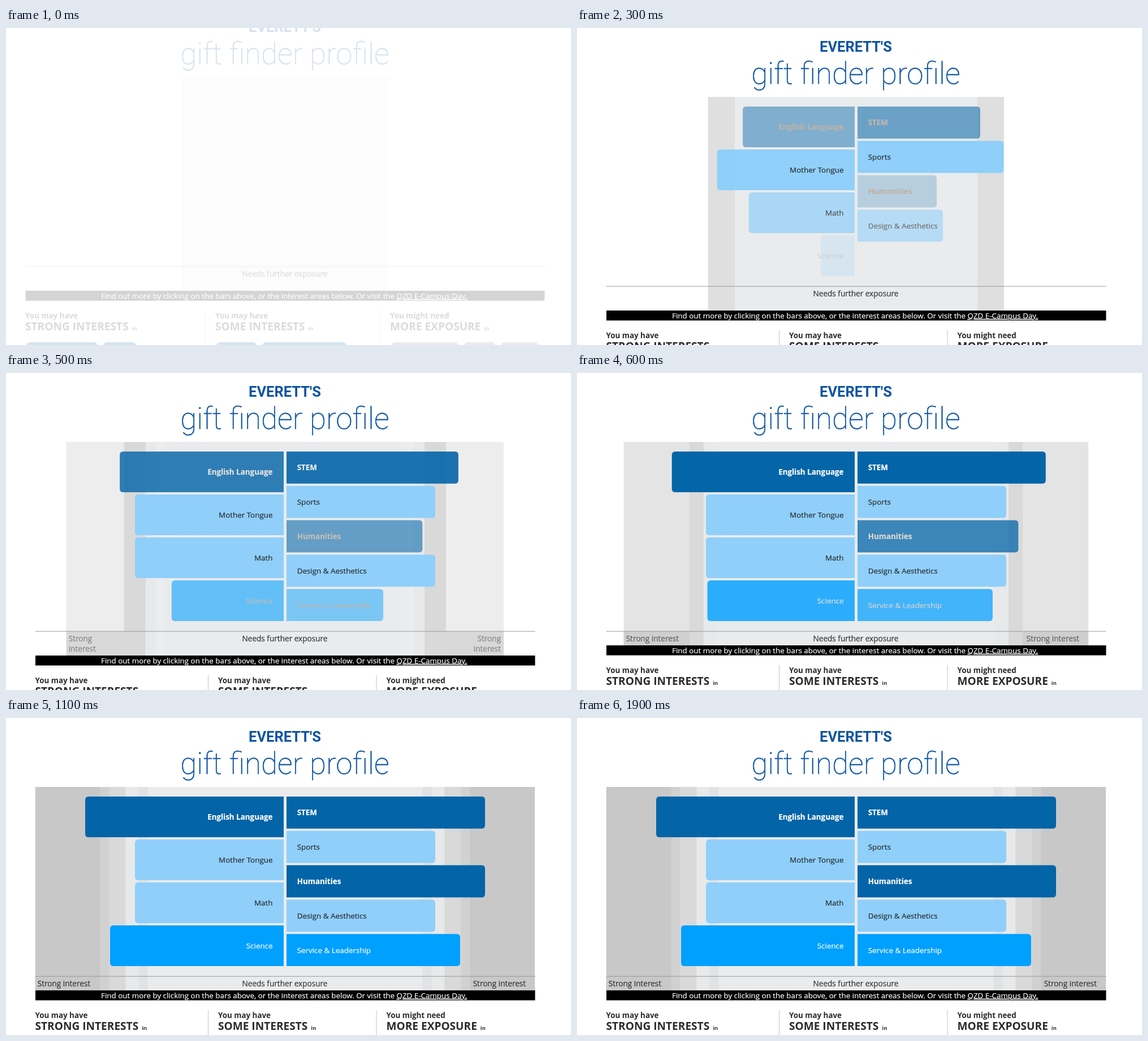
An HTML page that plays this animation: 999x561 px, repeating every 2000 ms.

```html
<!DOCTYPE html>
<html lang="en">
<head>
<meta charset="utf-8">
<title>Gift finder profile</title>
<style>
  html, body { margin: 0; width: 100%; height: 100%; overflow: hidden; background: #fff; }
  svg { display: block; width: 100%; height: 100%; font: 13.4px "Open Sans", sans-serif; color: #333; }
  text { fill: currentColor; stroke: currentColor; stroke-width: .2px; }
  .name { font: 700 25.5px Roboto, sans-serif; color: #0c54a3; stroke: none; }
  .title { font: 100 53px Roboto, sans-serif; color: #0c54a3; stroke-width: .6px; }
  .axis { font-size: 13.6px; }
  .lead, .head { font-weight: 700; color: #2b2b2b; stroke: none; }
  .head { font-size: 19.1px; }
  .in { font-size: 9.3px; }
  .note { color: #fff; }
</style>
</head>
<body>
<svg id="stage" viewBox="0 0 999 561"></svg>
<script>
const LOOP = 2000, STEP = 100;
const LEFT = 52, RIGHT = 935.5, MID = 493.4;
const TOP = 122, AXIS = 457, FOOT = 500;
const TAN = [189, 179, 166], WHITE = [255, 255, 255], DARK = [38, 42, 48];

const clamp = v => Math.max(0, Math.min(1, v));
const mix = (a, b, k) => a + (b - a) * k;
const rgb = c => `rgb(${c.map(Math.round)})`;
const swing = p => (1 - Math.cos(Math.PI * clamp(p))) / 2;
const easeOut = p => 1 - (1 - clamp(p)) ** 2;

function set(el, attrs) {
  for (const k in attrs) el.setAttribute(k, attrs[k]);
}
function add(parent, tag, attrs = {}, text = "") {
  const el = document.createElementNS("http://www.w3.org/2000/svg", tag);
  set(el, attrs);
  el.textContent = text;
  return parent.appendChild(el);
}

// Every level has its own width, growth and fade; lag is the fade delay per bar.
const LEVELS = {
  strong: { fill: "#0364a8", ink: WHITE, width: 351, lead: 322, grow: 1080, lag: 45, fade: 560 },
  some: { fill: "#00a0ff", ink: WHITE, width: 307, lead: 158, grow: 660, lag: 38, fade: 410 },
  weak: { fill: "#8fcffa", ink: DARK, width: 263, lead: 154, grow: 413, lag: 30, fade: 215 }
};
const LANGUAGE_SIDE = [
  ["English Language", "strong"], ["Mother Tongue", "weak"], ["Math", "weak"], ["Science", "some"]
];
const SUBJECT_SIDE = [
  ["STEM", "strong"], ["Sports", "weak"], ["Humanities", "strong"],
  ["Design & Aesthetics", "weak"], ["Service & Leadership", "some"]
];
const COLUMNS = [
  { x: 51.5, lead: "You may have", head: "STRONG INTERESTS", fill: "#0364a8", pills: [126, 58] },
  { x: 375, lead: "You may have", head: "SOME INTERESTS", fill: "#0364a8", pills: [71, 149] },
  { x: 672.5, lead: "You might need", head: "MORE EXPOSURE", fill: "#888", pills: [119, 55, 66] }
];

const page = add(document.getElementById("stage"), "g");
const bands = Array.from({ length: 6 }, () => add(page, "rect", { y: TOP }));

const ends = add(page, "g");
const sides = ["start", "end"].map(anchor => {
  const cell = add(ends, "rect", { y: AXIS, fill: "#c8c8c8" });
  const text = add(ends, "text", { class: "axis", "text-anchor": anchor });
  return { cell, lines: [add(text, "tspan", { y: 474.7 }), add(text, "tspan", { y: 493 })] };
});
const rule = add(page, "rect", { y: AXIS - .3, height: 1, fill: "#999" });

const centred = { x: 493, "text-anchor": "middle" };
add(page, "text", { ...centred, class: "name", y: 42 }, "EVERETT'S");
add(page, "text", { ...centred, class: "title", y: 98.5 }, "gift finder profile");
add(page, "text", { ...centred, class: "axis", y: 474.7 }, "Needs further exposure");

function makeSide(rows, side) {
  const gap = 4, pitch = (300 + gap) / rows.length;
  return rows.map(([label, name], row) => {
    const level = LEVELS[name], y = 139 + row * pitch, h = pitch - gap;
    const shape = add(page, "path", { fill: level.fill });
    const text = add(page, "text", {
      x: side < 0 ? 471.5 : 514.7, y: y + h / 2 + 4.9, "text-anchor": side < 0 ? "end" : "start"
    }, label);
    // Bars start in zigzag order, right side first.
    return { level, side, y, h, shape, text, order: 2 * row + (side < 0 ? 1 : 0) };
  });
}
const bars = [...makeSide(LANGUAGE_SIDE, -1), ...makeSide(SUBJECT_SIDE, 1)];

const foot = add(page, "g");
const strip = add(foot, "rect", { y: FOOT, height: 17.6 });
const note = add(foot, "text", { class: "note", x: 168, y: 513.8 },
  "Find out more by clicking on the bars above, or the interest areas below. Or visit the ");
add(note, "tspan", { "text-decoration": "underline" }, "QZD E-Campus Day.");

for (const col of COLUMNS) {
  col.g = add(foot, "g");
  add(col.g, "text", { class: "lead", y: 549 }, col.lead);
  const head = add(col.g, "text", { class: "head", y: 569.5 }, col.head);
  add(head, "tspan", { class: "in", dx: 6 }, "in");
  let x = 2;
  for (const width of col.pills) {
    add(col.g, "rect", { x, y: 591, width, height: 26, rx: 7, fill: col.fill });
    x += width + 10;
  }
}
const dividers = [357.5, 655].map(x =>
  ({ x, el: add(foot, "rect", { y: 535, width: 1, height: 60, fill: "#c4c4c4" }) }));

// Half width and grey of each nested background band, outermost first.
function bandState(t) {
  const age = clamp(t / 1000), late = clamp((t - 300) / 600);
  const body = mix(182.5, 327, Math.sqrt(age));
  const inner = (half, start) => Math.min(body, mix(214, half, swing((t - start) / 430)));
  return [
    [mix(318, 441.7, easeOut(late)), mix(255, 200, late)],
    [body, mix(231, 209, age)],
    [Math.min(body, 311), mix(231, 217, clamp(2 * age))],
    [inner(282, 290), 231],
    [inner(259, 340), mix(246, 224, age)],
    [inner(243, 450), 233]
  ];
}

function barPath({ side, y, h }, w) {
  const x = side < 0 ? 491 : 496, r = Math.min(6, w);
  const tip = x + side * w, bend = tip - side * r;
  return `M${x} ${y}H${bend}Q${tip} ${y} ${tip} ${y + r}V${y + h - r}Q${tip} ${y + h} ${bend} ${y + h}H${x}Z`;
}

function drawBar({ level, order, shape, text, ...box }, t) {
  const w = level.width * swing((t + level.lead - 38 * order) / level.grow);
  const a = clamp((t - level.lag * order) / level.fade);
  const k = clamp(level.ink === DARK ? 1.6 * a - .4 : 2 * a - 1);
  set(shape, { d: barPath(box, w), opacity: a });
  set(text, {
    color: rgb(TAN.map((v, i) => mix(v, level.ink[i], k))),
    opacity: clamp(5 * a),
    "font-weight": level === LEVELS.strong && t >= 200 ? 700 : 400
  });
}

function drawEnds(t, outer, inner, lift) {
  const wrap = !lift;
  const words = wrap ? ["Strong", "interest"] : ["Strong interest", ""];
  const xs = [MID - outer + 4, MID + outer - (wrap ? 5 : 16)];
  set(ends, { opacity: easeOut((t - 300) / 600) });
  sides.forEach(({ cell, lines }, i) => {
    set(cell, {
      x: i ? MID + inner : MID - outer,
      width: Math.max(0, outer - inner), height: FOOT - AXIS - lift
    });
    lines.forEach((line, n) => {
      set(line, { x: xs[i] });
      line.textContent = words[n];
    });
  });
}

function draw(t) {
  const q = (1 - clamp(t / 235)) ** 2;
  const lift = t < 600 ? 0 : 18;
  const spread = x => x + (x - 502) * .0388 * q;
  const wide = { x: spread(LEFT), width: spread(RIGHT) - spread(LEFT) };

  set(page, { opacity: 1 - .83 * q, transform: `translate(0 ${-35 * q})` });
  set(foot, { transform: `translate(0 ${-lift})` });
  set(rule, wide);
  set(strip, wide);

  const state = bandState(t);
  state.forEach(([half, g], i) => set(bands[i], {
    x: MID - half, width: 2 * half, height: FOOT - TOP - lift,
    fill: rgb(i > 2 ? [g, g + 2, g + 4] : [g, g, g])
  }));
  drawEnds(t, state[0][0], state[1][0], lift);
  bars.forEach(bar => drawBar(bar, t));

  COLUMNS.forEach(({ g, x }) => set(g, { transform: `translate(${spread(x)} 0)` }));
  dividers.forEach(({ el, x }) => set(el, { x: spread(x) - .5 }));
}

const begin = performance.now();
function tick() {
  const t = (performance.now() - begin) % LOOP;
  draw(Math.floor(t / STEP) * STEP);
  requestAnimationFrame(tick);
}
tick();
</script>
</body>
</html>
```
